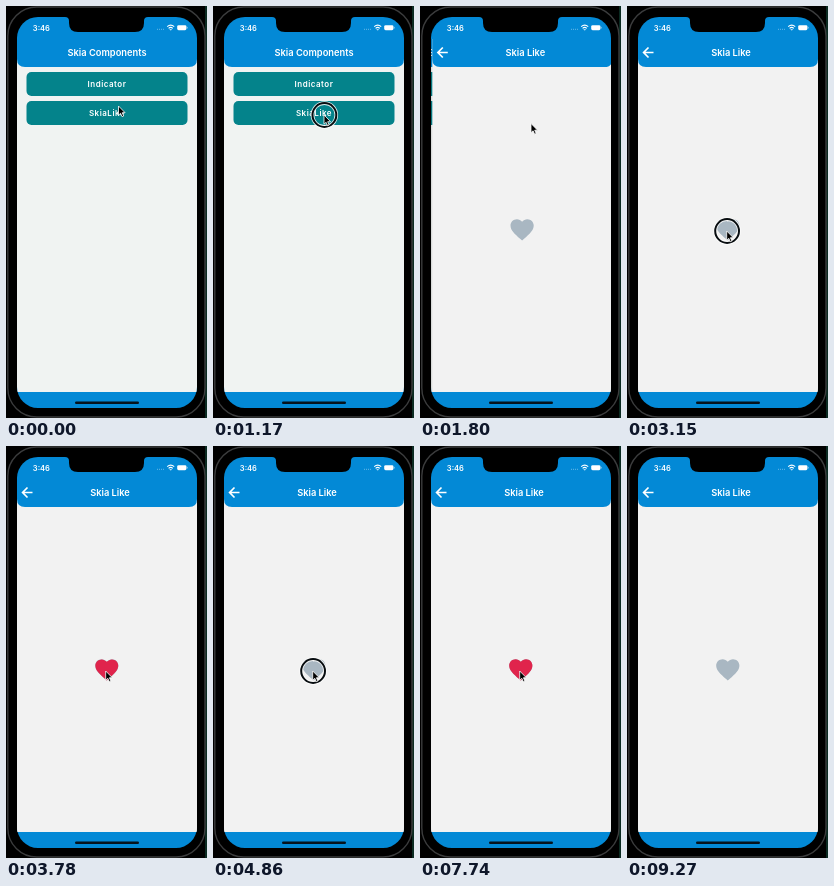
An HTML page for the animation above (9360 ms loop, 201 by 412 pixels).

```html
<!DOCTYPE html>
<html lang="en">
<head>
<meta charset="utf-8">
<title>Skia Components</title>
<style>
  html, body { margin: 0; width: 100%; height: 100%; overflow: hidden; background: #000; }
  svg { display: block; width: 100vw; height: 100vh; }
  text { font-family: Inter, Roboto, sans-serif; font-weight: 600; fill: #fff; }
  .title { font-size: 9.3px; text-anchor: middle; }
  .label { font-size: 8px; letter-spacing: .5px; text-anchor: middle; }
  .blue { fill: #0389d6; }
  .teal { fill: #04838b; }
</style>
</head>
<body>
<svg viewBox="0 0 201 412">
  <defs>
    <clipPath id="glass"><rect x="11" y="11" width="180" height="391" rx="21"/></clipPath>
    <clipPath id="view"><rect x="11" y="33" width="180" height="353"/></clipPath>
    <path id="header" d="M11 33H191V53Q191 61 183 61H19Q11 61 11 53Z"/>
    <path id="heart" d="M0 9.15l-1.45-1.32C-6.6 3.16-10 .08-10-3.7-10-6.78-7.58-9.2-4.5-9.2c1.74 0 3.41.81 4.5 2.09C1.09-8.39 2.76-9.2 4.5-9.2 7.58-9.2 10-6.78 10-3.7c0 3.78-3.4 6.86-8.55 11.54z"/>
  </defs>

  <!-- Phone body -->
  <rect width="201" height="412"/>
  <rect x="199" width="2" height="412" fill="#0b2b22"/>
  <rect x="1.8" y="1" width="197.2" height="410" rx="29" stroke="#3b3c3d" stroke-width="1.4"/>

  <g clip-path="url(#glass)">
    <rect class="blue" x="11" y="11" width="180" height="391"/>
    <g clip-path="url(#view)">
      <g id="menu">
        <rect x="11" y="33" width="240" height="353" fill="#f0f3f2"/>
        <use href="#header" class="blue"/>
        <text class="title" x="101" y="50">Skia Components</text>
        <rect class="teal" x="20.5" y="66" width="161" height="24" rx="5"/>
        <text class="label" x="101" y="81">Indicator</text>
        <rect class="teal" x="20.5" y="95" width="161" height="24" rx="5"/>
        <text class="label" x="101" y="110">SkiaLike</text>
      </g>
      <rect id="dim" x="11" y="33" width="180" height="353"/>
      <g id="detail">
        <rect x="11" y="33" width="180" height="353" fill="#f2f2f2"/>
        <use href="#header" class="blue"/>
        <path d="M26.5 46.5H17M21.5 41.5L16.6 46.5L21.5 51.5" fill="none" stroke="#fff" stroke-width="1.7"/>
        <text class="title" x="104" y="50">Skia Like</text>
        <use href="#heart" fill="#a9b7c2" transform="translate(100.8 224) scale(1.16)"/>
        <use id="liked" href="#heart" fill="#e0244c"/>
      </g>
    </g>
    <rect x="69" y="395.6" width="64" height="2.4" rx="1.2" fill="#06131c"/>
  </g>

  <!-- Notch and status bar -->
  <path d="M59 10H142V11Q138 11 138 15V17Q138 26 129 26H72Q63 26 63 17V15Q63 11 59 11Z"/>
  <text x="26.8" y="24.6" font-size="7.6">3:46</text>
  <path d="M151 23.3h7" stroke="#fff" stroke-opacity=".4" stroke-dasharray="1 1"/>
  <g fill="none" stroke="#fff" stroke-width="1.1">
    <path d="M161.2 20.7Q164.7 17.6 168.2 20.7M162.6 22.3Q164.7 20.5 166.8 22.3"/>
    <path d="M163.7 23.3L164.7 24.3L165.7 23.3" fill="#fff" stroke-width=".5"/>
  </g>
  <rect x="171.2" y="19.2" width="9.2" height="5" rx="1.4" fill="#fff"/>
  <path d="M181.2 20.9v1.6" stroke="#fff" stroke-opacity=".7" stroke-width=".8"/>

  <g id="ring" fill="none">
    <circle r="11.9" stroke="#fff" stroke-opacity=".85" stroke-width="3.6"/>
    <circle r="11.9" stroke="#080d10" stroke-width="2"/>
  </g>
  <path id="cursor" d="M0 0V9.2L2.1 7.3L3.6 10.7L5.2 10L3.7 6.7H6.6Z" fill="#000" stroke="#fff" stroke-width=".8" stroke-linejoin="round"/>
</svg>

<script>
  const LOOP = 9360, STEP = 90, WIDTH = 180;
  const PUSH = 1216;
  const TAPS = [1080, 3150, 4860, 6840];
  // Start and end of each liked state
  const LIKES = [[3330, 4230], [5040, 5850], [7020, 8370]];
  // Time, x, y of the pointer tip
  const POINTER = [
    [0, 112.5, 100], [90, 112.5, 100], [450, 111, 109], [1440, 111, 109],
    [1800, 111, 117.5], [2340, 106, 240], [2520, 101, 240], [2790, 99.5, 226],
    [2880, 99.5, 226], [2970, 99.7, 225], [9090, 99.7, 225], [9180, 105.5, 217],
    [LOOP, 105.5, 217]
  ];

  const el = id => document.getElementById(id);
  const place = (id, value) => el(id).setAttribute('transform', value);
  const show = (id, on) => { el(id).style.display = on ? '' : 'none'; };
  const clamp = v => Math.min(1, Math.max(0, v));

  function pointerAt(t) {
    const i = POINTER.findIndex(p => p[0] > t);
    const [t0, x0, y0] = POINTER[i - 1], [t1, x1, y1] = POINTER[i];
    const k = (t - t0) / (t1 - t0), e = k * k * (3 - 2 * k);
    return [x0 + (x1 - x0) * e, y0 + (y1 - y0) * e];
  }

  // Critically damped spring
  function pushAt(t) {
    const w = Math.max(0, t - PUSH) * 0.012;
    return t > 1800 ? 1 : 1 - (1 + w) * Math.exp(-w);
  }

  function likeAt(t) {
    const span = LIKES.find(([a, b]) => t >= a && t < b);
    if (!span) return 0;
    const k = clamp((t - span[0]) / 630);
    return k === 1 ? 1 : 1 - Math.exp(-6 * k) * Math.cos(9 * k);
  }

  function draw(ms) {
    const t = Math.floor((ms % LOOP) / STEP) * STEP;
    const push = pushAt(t), like = likeAt(t), [x, y] = pointerAt(t);
    place('menu', `translate(${-0.3 * WIDTH * push})`);
    place('detail', `translate(${WIDTH * (1 - push)})`);
    el('dim').style.opacity = 0.1 * push;
    show('liked', like > 0);
    place('liked', `translate(100.8 224) scale(${1.16 * like})`);
    show('cursor', t < 9270);
    place('cursor', `translate(${x} ${y})`);
    show('ring', TAPS.some(tap => t >= tap && t < tap + 180));
    place('ring', `translate(${x + 0.4} ${y})`);
  }

  const start = performance.now();
  function tick() {
    draw(performance.now() - start);
    requestAnimationFrame(tick);
  }
  tick();
</script>
</body>
</html>
```
